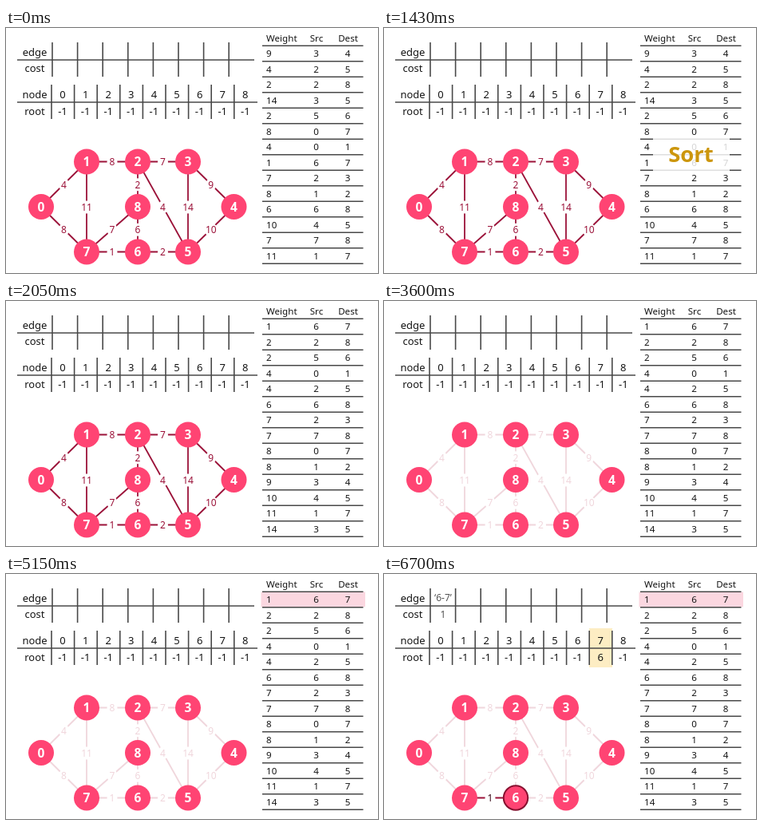
Write an HTML page that moves like this. It is 466 by 307 pixels and loops after 8000 ms.

```html
<!DOCTYPE html>
<html lang="en">
<head>
<meta charset="utf-8">
<title>Minimum spanning tree</title>
<style>
  html, body { margin: 0; width: 100%; height: 100%; overflow: hidden; background: #fff; }
  svg { display: block; width: 466px; height: 307px; font-family: "Noto Sans", "Open Sans", sans-serif; }
</style>
</head>
<body>
<svg id="stage" viewBox="0 0 466 307"></svg>
<script>
const stage = document.getElementById('stage');
const BLACK = '#151515', RULE = '#484848', WINE = '#9b1239', FADED = '#f0d6dc', PINK = '#ff4473';
const starts = [0, 500, 2050, 3600, 5150, 6700], LOOP = 8000;

// weight, source, destination
const edges = [
  [9, 3, 4], [4, 2, 5], [2, 2, 8], [14, 3, 5], [2, 5, 6], [8, 0, 7], [4, 0, 1],
  [1, 6, 7], [7, 2, 3], [8, 1, 2], [6, 6, 8], [10, 4, 5], [7, 7, 8], [11, 1, 7]
];
const sorted = [...edges].sort((a, b) => a[0] - b[0] || a[1] - b[1]);
const nodes = [
  [44, 224], [101, 167.5], [165, 167.5], [228, 167.5], [285.5, 224],
  [228, 280.5], [165, 280.5], [101, 280.5], [165, 224]
];

const line = (x1, y1, x2, y2, color = RULE, width = 1.6) =>
  `<path d="M${x1} ${y1}L${x2} ${y2}" stroke="${color}" stroke-width="${width}"/>`;
const rect = (x, y, w, h, fill, opacity = 1) =>
  `<rect x="${x}" y="${y}" width="${w}" height="${h}" fill="${fill}" opacity="${opacity}"/>`;
// y is the middle of the digits
const text = (s, x, y, size, fill = BLACK, anchor = 'middle', weight = 400) =>
  `<text x="${x}" y="${y + size * 0.357}" font-size="${size}" fill="${fill}" text-anchor="${anchor}" font-weight="${weight}">${s}</text>`;

function trackers(joined) {
  let out = joined ? rect(257, 68, 29, 49, '#fdedc3') : '';
  out += line(14, 40, 311, 40) + line(14, 93, 315, 93);
  ['edge', 'cost', 'node', 'root'].forEach((s, i) => {
    out += text(s, 36, [30, 50.5, 83, 104][i], 13);
  });
  for (let i = 0; i < 9; i++) {
    const x = 57 + i * 28.6, mid = x + 14;
    const edgeX = 58 + i * 31.6;
    if (edgeX < 300) out += line(edgeX, 18, edgeX, 61);
    out += line(x, 71, x, 114);
    out += text(i, mid, 83, 13) + text(joined && i === 7 ? 6 : -1, mid, 104, 13);
  }
  if (joined) out += text('‘6-7’', 74, 30, 12, '#555') + text(1, 74, 50.5, 12, '#555');
  return out;
}

function edgeTable(rows, marked) {
  let out = marked ? rect(319.5, 22.5, 130.5, 18.5, '#fbd7e0') : '';
  out += text('Weight', 326, 13, 11.6, BLACK, 'start') + text('Src', 389, 13, 11.6) + text('Dest', 428.5, 13, 11.6);
  out += line(321, 22.3, 447.5, 22.3);
  rows.forEach(([w, a, b], i) => {
    const y = 32 + i * 19.5;
    out += text(w, 326, y, 11.6, BLACK, 'start') + text(a, 388.5, y, 11.6) + text(b, 428, y, 11.6);
    out += line(321, y + 9.8, 447.5, y + 9.8);
  });
  return out;
}

function graph(faded, joined) {
  const used = (a, b) => joined && a === 6 && b === 7;
  let out = '';
  for (const [w, a, b] of edges) {
    const [x1, y1] = nodes[a], [x2, y2] = nodes[b];
    const mx = (x1 + x2) / 2, my = (y1 + y2) / 2 + 0.5;
    const on = used(a, b), color = faded && !on ? FADED : WINE;
    out += line(x1, y1, x2, y2, color, 1.8);
    out += `<ellipse cx="${mx}" cy="${my}" rx="${w > 9 ? 8.5 : 6.5}" ry="8" fill="#fff"/>`;
    out += text(w, mx, my, 12, on ? '#3a0a18' : color);
  }
  nodes.forEach(([x, y], i) => {
    const ring = joined && i === 6;
    out += `<circle cx="${x}" cy="${y}" r="${ring ? 15.2 : 16}" fill="${PINK}"` +
      (ring ? ' stroke="#86102f" stroke-width="2"' : '') + '/>';
    out += text(i, x, y, 15.5, '#fff', 'middle', 700);
  });
  return out;
}

function scene(step) {
  let out = trackers(step > 4) + graph(step > 2, step > 4);
  out += edgeTable(step < 2 ? edges : sorted, step > 3);
  if (step === 1) {
    out += rect(337, 137, 96, 43, '#fff', 0.82);
    out += text('Sort', 384.5, 158, 27.5, '#cc960c', 'middle', 700);
  }
  return out;
}

let shown = -1;
function tick() {
  const t = performance.now() % LOOP;
  const step = starts.filter(s => s <= t).length - 1;
  if (step !== shown) stage.innerHTML = scene(shown = step);
  requestAnimationFrame(tick);
}
tick();
</script>
</body>
</html>
```
